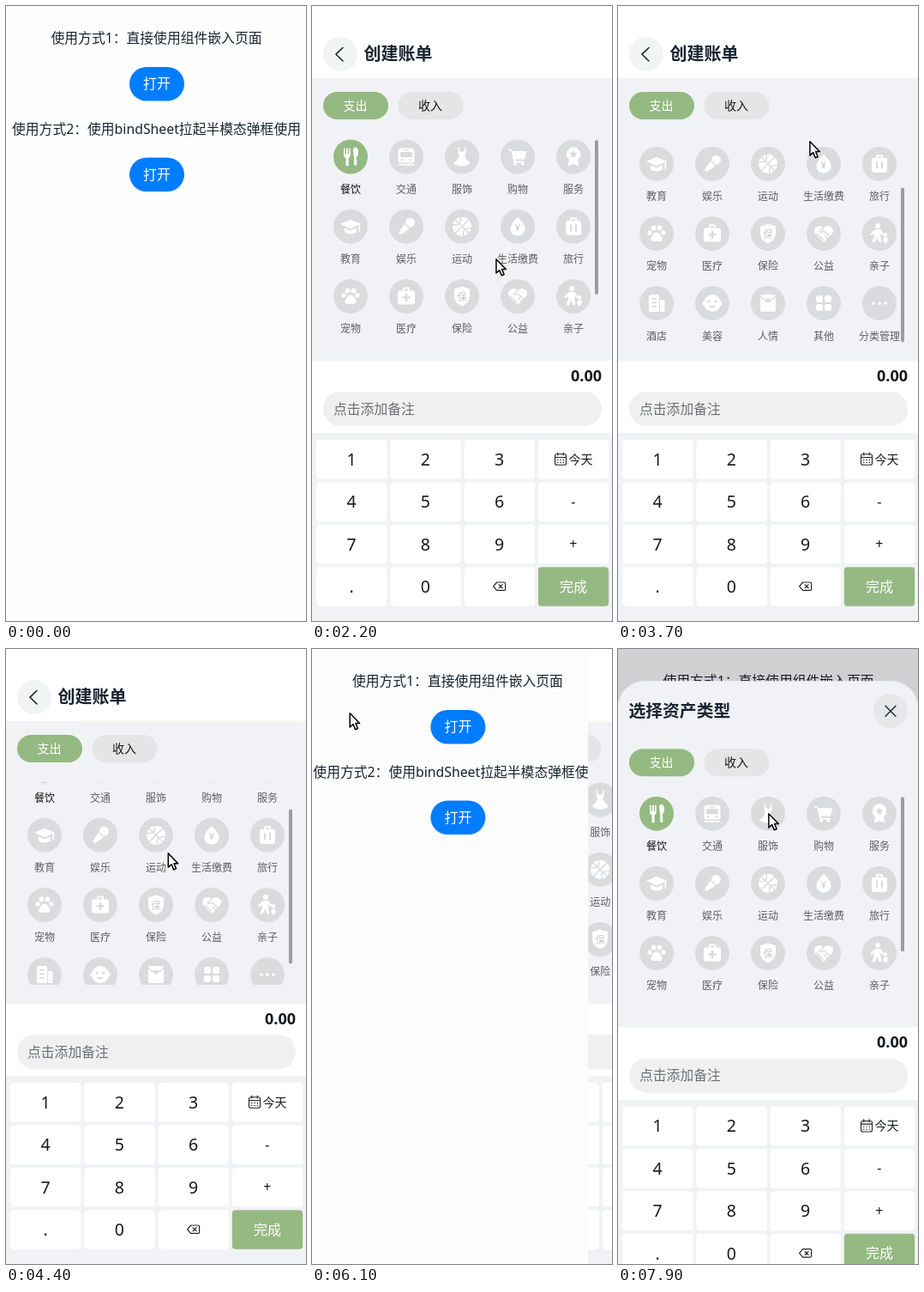
Animation, 350 px wide and 716 px high, one loop 8 s. Source, as an HTML page with a canvas:

```html
<!DOCTYPE html>
<html lang="zh">
<head>
<meta charset="utf-8">
<style>
html, body { margin: 0; width: 100%; height: 100%; overflow: hidden; background: #fff; }
canvas { display: block; width: 350px; height: 716px; }
</style>
</head>
<body>
<canvas id="stage" width="350" height="716"></canvas>
<script>
const g = document.getElementById('stage').getContext('2d');
const W = 350, H = 716, LOOP = 8000;
const FONT = '"Noto Sans","Noto Sans CJK SC","Noto Sans CJK",sans-serif';
const GREEN = '#95b982', GREY = '#dadbdd', PANEL = '#f1f2f5', INK = '#182431';

// ---- timing: [ms, value...] keys, eased between neighbours
const cursorKeys = [
  [200, 309, 658], [1000, 175, 91], [1650, 175, 91], [2200, 214, 294], [2450, 214, 294],
  [3000, 220, 171], [3400, 220, 171], [3700, 223, 157], [4050, 223, 157], [4480, 185, 245],
  [5400, 24, 56], [5950, 24, 56], [6600, 165, 188], [6750, 165, 188], [6900, 166.5, 195],
  [7350, 166.5, 195], [7850, 175, 191]];
const scrollKeys = [[2450, 0], [3020, 69.5], [3450, 69.5], [3700, 73], [4050, 73], [4800, 0]];

function tween(keys, t) {
  const i = keys.findIndex(k => k[0] > t);
  if (i === 0) return keys[0].slice(1);
  if (i < 0) return keys[keys.length - 1].slice(1);
  const a = keys[i - 1], b = keys[i], u = (t - a[0]) / (b[0] - a[0]), s = u * u * (3 - 2 * u);
  return a.slice(1).map((v, n) => v + (b[n + 1] - v) * s);
}

// critically damped spring, 0 to 1
function spring(ms) {
  const x = Math.max(0, ms) * 0.0185;
  return 1 - Math.exp(-x) * (1 + x);
}

// ---- drawing helpers
function text(s, x, y, size, color, align = 'center', weight = 400) {
  g.font = `${weight} ${size}px ${FONT}`;
  g.textAlign = align;
  g.fillStyle = color;
  g.fillText(s, x, y + size * 0.37);
}
function box(x, y, w, h, r, color) {
  g.fillStyle = color;
  g.beginPath();
  g.roundRect(x, y, w, h, r);
  g.fill();
}
function disc(x, y, r, color) {
  box(x - r, y - r, 2 * r, 2 * r, r, color);
}
function line(d, color, width) {
  g.strokeStyle = color;
  g.lineWidth = width;
  g.stroke(new Path2D(d));
}
function at(x, y, draw) {
  g.save();
  g.translate(x, y);
  draw();
  g.restore();
}

// ---- category icons: white shape, cut-out shape, cut-out lines, cut-out letter
const C = (x, y, r) => `M${x - r} ${y}a${r} ${r} 0 1 0 ${2 * r} 0a${r} ${r} 0 1 0 ${-2 * r} 0z`;
const B = (x, y, w, h, r) => `M${x + r} ${y}h${w - 2 * r}a${r} ${r} 0 0 1 ${r} ${r}v${h - 2 * r}` +
  `a${r} ${r} 0 0 1 ${-r} ${r}h${2 * r - w}a${r} ${r} 0 0 1 ${-r} ${-r}v${2 * r - h}a${r} ${r} 0 0 1 ${r} ${-r}z`;
const HANDLE = 'M-4-6.5v-4h8v4h-2v-2h-4v2z';
const items = [
  ['餐饮', 'M-8-10h1.6v7h1.4v-7h1.8v7h1.4v-7h1.6v8q0 3-2.3 3.6l.3 8.4q-1.7 1.6-3.4 0l.3-8.4q-2.7-.6-2.7-3.6z' +
    'M3-7q0-4 3-4q3 1 3 6q0 4-2 5l.4 9.5q-1.7 1.6-3.2 0L4 0z'],
  ['交通', B(-9.5, -10, 19, 17, 3) + B(-9.5, 8.3, 19, 1.8, 0.9),
    B(-7, -5.5, 14, 6, 1) + B(-3.5, -8.3, 7, 1.2, 0.6) + C(-5, 3.7, 1.3) + C(5, 3.7, 1.3)],
  ['服饰', 'M-4.5-11h1.5v4q3 2.5 6 0v-4h1.5v6l-1.5 4q2 5 7 9q-10 6-20 0q5-4 7-9l-1.5-4z'],
  ['购物', 'M-11-9h3.5l1 2.5h17l-2.5 9.5h-11.5l.5 2h11v1.8h-12.5l-3.2-13.8h-3.3z' + C(-3, 8.5, 1.8) + C(5.5, 8.5, 1.8)],
  ['服务', C(0, -3, 8.3) + 'M-5 3l-1.5 8 6.5-2.5 6.5 2.5-1.5-8z',
    'M0-7.5l1.4 2.8 3.1.4-2.3 2.2.6 3.1-2.8-1.5-2.8 1.5.6-3.1-2.3-2.2 3.1-.4z'],
  ['教育', 'M0-8l12 5-12 5.5-12-5.5zM-7 1.5l7 3.2 7-3.2v5q-7 4.5-14 0zM9.5-2h1.6v8h-1.6z'],
  ['娱乐', C(4.5, -4.5, 5.5) + 'M-1.5-4l6 6-11 7.5-2.5-2.5z', 'M-2-4.6l6.8 6.8-1 .8-6.6-6.6z'],
  ['运动', C(0, 0, 11), '', 'M-8-8L8 8M8-8L-8 8M-2-11Q1-1-11-2M2 11Q-1 1 11 2'],
  ['生活缴费', 'M0-11q8.5 8 8.5 13.5a8.5 8.5 0 0 1-17 0q0-5.5 8.5-13.5z', '', '', '¥'],
  ['旅行', B(-9, -7, 18, 17, 2.5) + HANDLE, B(-4, -3, 2, 9, 1) + B(2, -3, 2, 9, 1)],
  ['宠物', C(-8, -1, 2.6) + C(8, -1, 2.6) + C(-3.5, -6.5, 2.9) + C(3.5, -6.5, 2.9) +
    'M0-1.5q3 0 5 4q2.5 2.5 1.5 5q-1.5 2.5-6.5 1.2q-5 1.3-6.5-1.2q-1-2.5 1.5-5q2-4 5-4z'],
  ['医疗', B(-10, -6.5, 20, 16, 2.5) + HANDLE, B(-1.2, -3, 2.4, 9, 0.5) + B(-4.5, 0.3, 9, 2.4, 0.5)],
  ['保险', 'M0-11.5l9 3v8q0 8-9 12q-9-4-9-12v-8z', '', '', '保'],
  ['公益', 'M0 10l-9.5-9.5q-3-4 0-7.5q4.5-4 9.5 0q5-4 9.5 0q3 3.5 0 7.5z', '', 'M0-7l-5 4.5q2 2.5 5-.5l7 6M-8 0l7 7M1 2l4 4'],
  ['亲子', C(-2, -9, 3) + 'M-5-5h6.5l4 6-1.7 1.3-3-3 1.5 11h-2.8l-2-6-3 6h-3l2.5-8-1-2-2.5 2-1.5-1.5z' +
    C(7, 1.5, 2.3) + 'M5 4.5h4.5v3.5l-1 3.3h-3l-1-3.3z'],
  ['酒店', B(-9, -10, 12, 20, 1.5) + 'M4-4h4q1.5 0 1.5 1.5v12.5h-5.5z',
    B(-6, -6, 6, 1.6, 0.5) + B(-6, -1.5, 6, 1.6, 0.5) + B(-6, 3, 6, 1.6, 0.5)],
  ['美容', C(0, 0, 10) + C(-9, 0, 2.5) + C(9, 0, 2.5), C(-4, -2, 1.6) + C(4, -2, 1.6) + 'M-4.5 3h9q-4.5 5-9 0z'],
  ['人情', B(-9, -10, 18, 20, 2), C(0, -3, 2.6), 'M-9-8Q0 2 9-8'],
  ['其他', B(-9, -9, 8, 8, 2.5) + B(1, -9, 8, 8, 2.5) + B(-9, 1, 8, 8, 2.5) + B(1, 1, 8, 8, 2.5)],
  ['分类管理', C(-7, 0, 1.8) + C(0, 0, 1.8) + C(7, 0, 1.8)]];

function category([label, shape, cut, lines, letter], i) {
  const back = i ? GREY : GREEN;
  at(45 + i % 5 * 65, 175.5 + Math.floor(i / 5) * 81.2, () => {
    disc(0, 0, 20, back);
    g.fillStyle = '#fff';
    g.fill(new Path2D(shape));
    g.fillStyle = back;
    if (cut) g.fill(new Path2D(cut));
    if (lines) line(lines, back, 1.4);
    if (letter) text(letter, 0, 1, 11, '#c4c5c8', 'center', 500);
    text(label, 0, 38, 12, i ? '#5c5e62' : '#111', 'center', i ? 400 : 500);
  });
}

// ---- screen parts
function picker(scroll) {
  box(13, 100, 76, 32, 16, GREEN);
  box(100.5, 100, 76, 32, 16, '#e4e5e7');
  text('支出', 50.5, 116, 14, '#fff');
  text('收入', 138, 116, 14, '#16181b', 'center', 500);
  g.save();
  g.beginPath();
  g.rect(0, 155, W, 236);
  g.clip();
  at(0, -scroll, () => items.forEach(category));
  g.restore();
  box(330, 156 + scroll * 0.76, 4, 180, 2, '#9b9da2');
}

function keypad() {
  box(0, 413, W, 84, 0, '#fff');
  text('0.00', 338, 430, 18, '#16181b', 'right', 700);
  box(13, 449, 325, 40, 20, '#f0f0f1');
  text('点击添加备注', 25, 469, 15.8, '#6c6f74', 'left');
  box(0, 497, W, 250, 0, PANEL);
  ['1', '2', '3', '今天', '4', '5', '6', '-', '7', '8', '9', '+', '.', '0', '⌫', '完成'].forEach((key, i) => {
    const x = 5 + i % 4 * 86.3, y = 505 + Math.floor(i / 4) * 49.4, cx = x + 41, cy = y + 22.5;
    const done = key === '完成';
    box(x, y, 82.3, 45.5, 4, done ? GREEN : '#fff');
    if (key === '⌫') {
      at(cx, cy, () => line('M-7 0l4-4.7h8.5q1.5 0 1.5 1.5v6.4q0 1.5-1.5 1.5h-8.5zM-.5-2l4 4M3.5-2l-4 4', '#222', 1.2));
    } else if (key === '今天') {
      text(key, 313.5, cy, 14, '#16181b');
      at(290, cy, () => {
        line(B(-6.5, -5.7, 13, 12.5, 2) + 'M-6.5-2h13M-3.2-7.5v3M3.2-7.5v3', '#222', 1.1);
        line('M-3.3 1h.2M0 1h.2M3.3 1h.2M-3.3 4h.2M0 4h.2M3.3 4h.2', '#222', 1.3);
      });
    } else {
      const big = i % 4 < 3;
      text(key, cx, cy, big ? 19.5 : 16, done ? '#fff' : '#16181b', 'center', big ? 500 : 400);
    }
  });
}

function home(press1, press2) {
  box(0, 0, W, H, 0, '#fefefe');
  text('使用方式1：直接使用组件嵌入页面', 175.5, 37.5, 15.8, INK);
  text('使用方式2：使用bindSheet拉起半模态弹框使用', 175.5, 143.5, 15.8, INK);
  [[71, press1], [176.5, press2]].forEach(([y, pressed]) => {
    box(144, y, 64, 39.5, 19.75, pressed ? '#0073eb' : '#007dff');
    text('打开', 176, y + 19.5, 16, '#fff', 'center', 500);
  });
}

// The page edge moves the full way, its content only half of it.
function page(p, scroll) {
  const off = W * (1 - p);
  g.save();
  g.beginPath();
  g.rect(off, 0, W, H);
  g.clip();
  at(off / 2, 0, () => {
    box(0, 0, W, H, 0, PANEL);
    box(0, 0, W, 84, 0, '#fff');
    picker(scroll);
    keypad();
  });
  at(off, 0, () => {
    g.globalAlpha = Math.max(0, (p - 0.7) / 0.3);
    disc(33, 56, 20, '#f2f4f4');
    line('M36 48.5L28 56.2L36 64', INK, 1.6);
    g.globalAlpha = p;
    text('创建账单', 60.5, 56, 20, INK, 'left', 700);
  });
  g.restore();
}

function sheet(y) {
  at(0, y - 37, () => {
    box(0, 37, W, H + 40, [31, 31, 0, 0], PANEL);
    text('选择资产类型', 12.5, 72, 19.8, INK, 'left', 700);
    disc(318, 72, 20, '#e5e7e9');
    line('M312 66l12 12M324 66l-12 12', INK, 1.4);
    at(0, 16, () => picker(0));
    at(0, 27.5, keypad);
  });
}

function cursor(x, y) {
  at(x + 0.9, y + 0.7, () => {
    const arrow = new Path2D('M0 0V16.2L3.8 12.9L6.4 19L9.2 17.8L6.7 11.8H11.4Z');
    g.fillStyle = '#fff';
    g.fill(arrow);
    g.strokeStyle = '#000';
    g.lineWidth = 1.5;
    g.stroke(arrow);
  });
}

function render(t) {
  const p = t < 5875 ? spring(t - 1374.5) : 1 - spring(t - 5875);
  g.lineJoin = g.lineCap = 'round';
  at(-71 * p, 0, () => home(t > 1150 && t < 1373, t > 7050 && t < 7350));
  if (p > 0.001) {
    box(0, 0, W, H, 0, `rgba(0,0,0,${0.1 * p})`);
    page(p, tween(scrollKeys, t)[0]);
  }
  if (t > 7285) {
    box(0, 0, W, H, 0, `rgba(0,5,15,${0.18 * spring(t - 7285)})`);
    sheet(H - (H - 37) * spring(t - 7305));
  }
  if (t >= 200) cursor(...tween(cursorKeys, t));
}

const start = performance.now();
function frame() {
  g.fillStyle = '#fefefe';
  g.fillRect(0, 0, W, H);
  render((performance.now() - start) % LOOP);
  requestAnimationFrame(frame);
}
frame();
</script>
</body>
</html>
```
